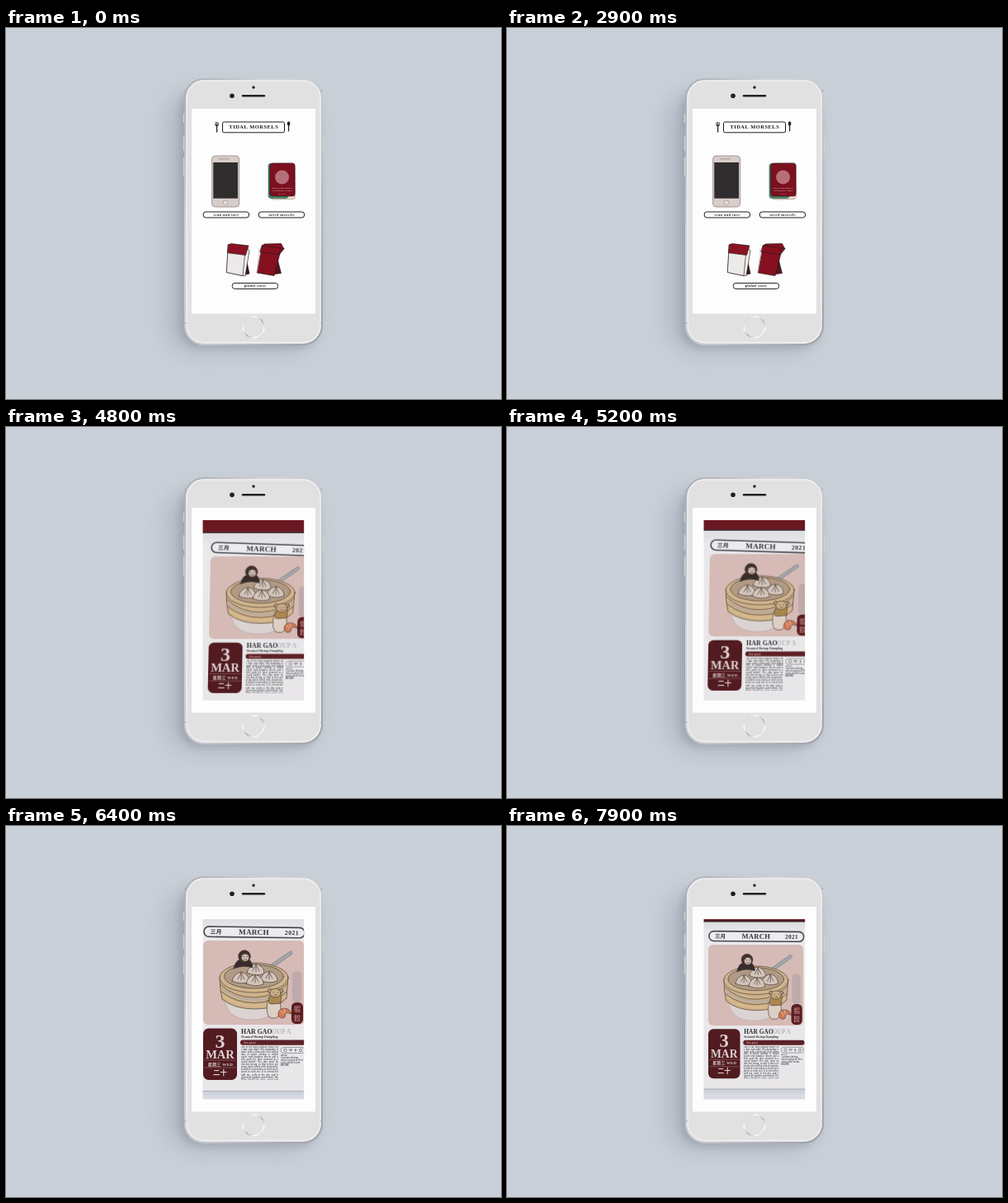
These frames come from a looping animation (600 by 450 pixels, 8 s). An HTML page:

```html
<!DOCTYPE html>
<html lang="en">
<head>
<meta charset="utf-8">
<title>Calendar app</title>
<style>
html, body { margin: 0; width: 100%; height: 100%; overflow: hidden; background: #cad0d8; }
svg { display: block; width: 600px; height: 450px; }
text { font-family: "Liberation Serif", "Noto Sans CJK SC", "Noto Sans CJK", serif; font-weight: bold; text-anchor: middle; }
.start text, text.start { text-anchor: start; }
.label text { font-size: 4.5px; letter-spacing: .38px; fill: #222; }
.pill { fill: #fff; stroke: #1c1a1b; stroke-width: 1; }
.ink { stroke: #453730; stroke-width: .65; stroke-linejoin: round; stroke-linecap: round; }
.copy { font: 2.7px/3.05px "Noto Serif", serif; color: #38363c; text-align: justify; overflow: hidden; }
</style>
</head>
<body>
<svg viewBox="0 0 600 450">
<defs>
  <linearGradient id="rim" x2="1" y2="1">
    <stop stop-color="#a9adb3"/><stop offset=".3" stop-color="#d3d5d8"/><stop offset=".6" stop-color="#c3c5c9"/><stop offset="1" stop-color="#9da0a6"/>
  </linearGradient>
  <linearGradient id="ring" x2="1" y2="1">
    <stop stop-color="#b5b6b9"/><stop offset=".3" stop-color="#fff"/><stop offset=".55" stop-color="#aeafb3"/><stop offset=".8" stop-color="#fff"/><stop offset="1" stop-color="#b5b6b9"/>
  </linearGradient>
  <linearGradient id="paper" x2="0" y2="1">
    <stop stop-color="#d5d6da"/><stop offset=".12" stop-color="#e9e8ea"/><stop offset="1" stop-color="#e8e6e8"/>
  </linearGradient>
  <linearGradient id="desk" x2="0" y2="1">
    <stop stop-color="#b9c1cc"/><stop offset=".35" stop-color="#d9dde3"/><stop offset="1" stop-color="#b9b4ae"/>
  </linearGradient>
  <filter id="wide" x="-40%" y="-20%" width="180%" height="140%"><feGaussianBlur stdDeviation="15"/></filter>
  <filter id="near" x="-20%" y="-10%" width="140%" height="120%"><feGaussianBlur stdDeviation="5"/></filter>
  <filter id="lens"><feGaussianBlur stdDeviation=".45"/></filter>
  <clipPath id="view"><path d="M238.5 113H361.2V331.6H238.5Z"/></clipPath>
</defs>

<rect width="600" height="450" fill="#cad0d8"/>
<rect x="196" y="78" width="176" height="314" rx="30" fill="#939ba7" opacity=".5" filter="url(#wide)"/>
<rect x="211" y="74" width="168" height="314" rx="24" fill="#868d98" opacity=".45" filter="url(#near)"/>

<!-- handset -->
<path d="M216 104V115M216 131V149M216 157V180M384 132V153" stroke="#cfd1d4" stroke-width="2.4"/>
<rect x="217" y="62" width="166" height="322" rx="23" fill="#e2e1e2" stroke="url(#rim)" stroke-width="2"/>
<rect x="219" y="64" width="162" height="317.5" rx="21" fill="none" stroke="#efeff0" stroke-width="1.4"/>
<path d="M216 76H219M381 76H384M216 358H219M381 358H384" stroke="#a9abae"/>
<circle cx="300" cy="72" r="1.7" fill="#222"/>
<circle cx="274" cy="82.3" r="2.8" fill="#1f1e22"/>
<path d="M287 82.3H313" stroke="#222" stroke-width="2.4" stroke-linecap="round"/>
<circle cx="300" cy="362.8" r="12.8" fill="#e2e1e2" stroke="url(#ring)" stroke-width="1.7"/>
<rect x="225" y="98" width="150" height="248.5" fill="#fefdfe"/>

<g id="home">
  <rect class="pill" x="262.5" y="114" width="75" height="12.8" rx="1.8"/>
  <text x="300.3" y="122.4" font-size="6.4" letter-spacing=".55" fill="#1c1a1b">TIDAL MORSELS</text>
  <g fill="none" stroke="#222" stroke-linecap="round">
    <path d="M254 114.4V117.2M255.6 114.4V118M257.2 114.4V117.2" stroke-width=".8"/>
    <path d="M254 117.5Q255.6 120 257.2 117.5M255.6 119V126" stroke-width="1.3"/>
    <path d="M342.6 118V125" stroke-width="1.2"/>
  </g>
  <ellipse cx="342.6" cy="116" rx="1.8" ry="2.7" fill="#222"/>

  <rect x="249.6" y="155" width="33" height="62" rx="4" fill="#d9cdc9" stroke="#8d8583" stroke-width=".8"/>
  <path d="M258 158.7H271" stroke="#a59a97" stroke-width="1.4" stroke-dasharray="1.5 .7"/>
  <circle cx="266" cy="211.7" r="2.8" fill="#e7dedb" stroke="#948b89" stroke-width=".6"/>
  <rect x="251.2" y="163" width="29.8" height="43.7" fill="#302d2e"/>
  <g id="preview">
    <rect x="251.2" y="163" width="29.8" height="43.7" fill="#fdfbfb"/>
    <rect x="254" y="165.8" width="23.5" height="2.7" rx="1.3" fill="#fff" stroke="#555" stroke-width=".5"/>
    <rect x="253.4" y="171" width="25" height="20.5" rx="1" fill="#ebcbae"/>
    <g class="ink">
      <path d="M258 180.5Q258 189 266 188.5T275 180Z" fill="#c59a62"/>
      <ellipse cx="266.3" cy="180.2" rx="8.5" ry="3.8" fill="#e8dac4"/>
      <path d="M270 178L276 173.5" stroke="#777"/>
      <circle cx="263" cy="175.5" r="2" fill="#463330"/><circle cx="271" cy="185.8" r="2" fill="#d7b68c"/>
    </g>
    <rect x="253.4" y="193" width="8.5" height="10.5" rx="1.5" fill="#761522"/>
    <path d="M264 194.5H278M264 197H278M264 199.5H278M264 202H275" stroke="#aaa5a5" stroke-width=".8"/>
  </g>

  <rect x="321" y="163.8" width="29" height="44" rx="3" fill="#eee0ce" stroke="#6e6760" stroke-width=".5" transform="rotate(-1 335 186)"/>
  <rect x="318" y="164.5" width="24" height="42" rx="3" fill="#3b8a6d" stroke="#284b40" stroke-width=".5"/>
  <rect x="319.8" y="164.2" width="30.4" height="39.8" rx="3" fill="#7c101f" stroke="#3c1016" stroke-width=".6"/>
  <circle cx="334.6" cy="181" r="8.5" fill="#b66f78"/>
  <g fill="#e0b9bb" letter-spacing=".15">
    <text x="334.8" y="195" font-size="2.8">TIDAL MORSELS</text>
    <text x="334.8" y="198.4" font-size="2.3">CALENDAR CARDS</text>
    <text x="334.8" y="201.5" font-size="2.3">2 0 2 1</text>
  </g>

  <g class="ink" style="stroke:#241b1c">
    <path d="M290 274L295 298 286 300Z" fill="#3b1419"/>
    <path d="M270 263L291 265.5 295 270 290 300.5 287 300.5 268 296.5Z" fill="#f6f1ee"/>
    <path d="M269.6 263L290.5 265.5 287 300.5 267.6 296.5Z" fill="#eceae9"/>
    <path d="M269.6 262.8L273 261.6 294 264 290.5 275.5 268.8 272.8Z" fill="#8b1222"/>
    <path d="M327 272L333.5 297.5 322 299Z" fill="#56131c"/>
    <path d="M310.5 264L334 266 325 300.5 304.5 297Z" fill="#86101f"/>
    <path d="M310.5 264L313 262 333.5 261.5 337 268 331 275 308 271.5Z" fill="#86101f"/>
    <path d="M310.5 264L332.5 267 331 275M332.5 267L337 267.5" fill="none"/>
    <path d="M307 267L303.8 296" stroke="#d9cfcd" fill="none"/>
  </g>

  <g class="label">
    <rect class="pill" x="239.2" y="223" width="55.3" height="7" rx="3"/><text x="267" y="228">scan and save</text>
    <rect class="pill" x="306.3" y="223" width="55.3" height="7" rx="3"/><text x="334" y="228">saved morsels</text>
    <rect class="pill" x="274.3" y="309.4" width="55.3" height="7" rx="3"/><text x="302" y="314.4">global store</text>
  </g>
</g>

<g id="camera" clip-path="url(#view)">
  <g id="page" filter="url(#lens)">
    <rect x="200" y="313" width="200" height="50" fill="url(#desk)"/>
    <rect x="200" y="100" width="200" height="222" fill="url(#paper)"/>
    <path d="M200 321.5H400" stroke="#a9b2be" stroke-width="1.2"/>
    <rect x="200" y="60" width="200" height="49" fill="#6c1822"/>
    <path d="M200 109.3H400" stroke="#3b2327" stroke-width="2"/>
    <g id="head">
      <rect x="240" y="122" width="122" height="12.4" rx="6" fill="#ecebee" stroke="#48464d" stroke-width="1.6"/>
      <g fill="#37343a">
        <text x="254.5" y="130.8" font-size="7">三月</text>
        <text x="300.5" y="131.1" font-size="9.2" letter-spacing=".2">MARCH</text>
        <text x="346.5" y="130.8" font-size="7.8" letter-spacing=".4">2021</text>
      </g>
    </g>

    <rect x="239" y="139" width="122.5" height="102" rx="6" fill="#d5bab6"/>
    <path d="M318 173L345 154" stroke="#85868b" stroke-width="4.6" stroke-linecap="round"/>
    <path d="M318 173L345 154" stroke="#a5a7ab" stroke-width="3.2" stroke-linecap="round"/>
    <g class="ink">
      <path d="M265 210Q268 235 298 235T330 210Z" fill="#dbd3d2" stroke="#b5aaa8"/>
      <path d="M259 183Q259 198 262 210Q276 222 302 222T340 209L342 183Z" fill="#cdb18b"/>
      <path d="M259.5 192Q278 209 302 208T341.5 191M261 201Q279 215 302 214.5T340.5 201" fill="none"/>
      <path d="M263 198Q280 211 302 211T339 198" fill="none" stroke="#b5aba2" stroke-width="2.2"/>
      <path d="M264 207Q280 218 302 218T338 207" fill="none" stroke="#d8bc8a" stroke-width="2.2"/>
      <ellipse cx="300.5" cy="184" rx="41.5" ry="18" fill="#cfb48c"/>
      <ellipse cx="300.5" cy="182.5" rx="36" ry="14.5" fill="#b19a83"/>
      <g id="buns" fill="#d3c5bc"></g>
      <path d="M276 173Q278 163 284 162L295 162Q299 166 299 172Q288 168 276 173Z" fill="#382c2c"/>
      <circle cx="289" cy="158" r="7.3" fill="#3e3130"/>
      <ellipse cx="290" cy="159.6" rx="4.8" ry="4.6" fill="#d0bab2"/>
      <path d="M287.5 158.5H288.3M291.8 158.5H292.6M288.5 161.8Q290 162.8 291.5 161.8" fill="none"/>
      <path d="M317 212Q314 232 322 233Q334 235 333 219L331 210Z" fill="#ddcfc4"/>
      <path d="M319 207Q316 216 322 216L333 215 334 205Z" fill="#aa874f"/>
      <circle cx="320" cy="200" r="2.6" fill="#b49a79"/><circle cx="333" cy="200" r="2.6" fill="#b49a79"/>
      <ellipse cx="326.5" cy="202.5" rx="6.5" ry="5.3" fill="#c9ad86"/>
      <path d="M324 202H324.5M329 202H329.5M325.5 205H328" fill="none"/>
      <path d="M330 230Q329 222 337 221Q345 222 346 228Q341 225 338 228Q340 233 334 233Z" fill="#d27b54"/>
      <path d="M333 224L336 228M337 221.5L338 227" stroke="#f1d5c2" fill="none"/>
    </g>
    <rect x="347" y="176" width="11" height="38" rx="5" fill="#a89a9e" opacity=".5"/>
    <rect x="346" y="214" width="14" height="26" rx="5.5" fill="#5a1d23"/>
    <g fill="#b27772" font-size="8"><text x="353" y="225.3">蝦</text><text x="353" y="236">餃</text></g>

    <rect x="239" y="245.5" width="41" height="62.5" rx="6.5" fill="#511b20"/>
    <g fill="#ddd0d1">
      <text x="259.5" y="268.5" font-size="24">3</text>
      <text x="259.5" y="281.5" font-size="14.5">MAR</text>
      <text x="260" y="290.5" font-size="5" letter-spacing=".35">星期三 WED</text>
      <text x="259.5" y="302" font-size="8.5">二十</text>
    </g>
    <path d="M240 284H279M240 293H279" stroke="#9a7276" stroke-width=".6"/>

    <g class="start">
      <text x="322" y="251.8" font-size="7.6" fill="#aaa8ad" opacity=".8" letter-spacing=".2">OUP A</text>
      <text x="285" y="252" font-size="7.8" fill="#302d33" letter-spacing=".1">HAR GAO</text>
      <text x="285" y="257" font-size="3.8" fill="#3d3a40">Steamed Shrimp Dumpling</text>
    </g>
    <rect x="284" y="259.6" width="79" height="6.2" rx="3" fill="#5d2027"/>
    <text class="start" x="288" y="263.8" font-size="3.3" fill="#b98f92">(har gaau)</text>
    <foreignObject x="284.5" y="267" width="45.5" height="41.5"><div class="copy" xmlns="http://www.w3.org/1999/xhtml" style="height:41px">One of the most popular dishes on a dim sum table, this dumpling is made with a thin and clear wheat skin. A whole shrimp is folded inside with bamboo shoots and a little pork fat, then steamed in a round basket. The skin must be thin but strong, so that it does not break when lifted with chopsticks. A skilled cook makes at least seven pleats in each one. It is served hot with tea, early in the day, and is shared by families and friends. The filling should be crisp, sweet and full of juice, and each piece is eaten in one or two bites.</div></foreignObject>
    <rect x="333" y="268.5" width="29" height="7" rx="3.4" fill="#eae8eb" stroke="#7a777e" stroke-width=".7"/>
    <g fill="none" stroke="#5b585f" stroke-width=".7">
      <circle cx="338.5" cy="272" r="1.8"/><path d="M343 271Q345 275 347 271ZM351 270V274M349.8 272H352.2"/><circle cx="357" cy="272" r="1.7"/>
    </g>
    <foreignObject x="333" y="277" width="29" height="16"><div class="copy" xmlns="http://www.w3.org/1999/xhtml" style="text-align:left"><b>NOTE</b><br/>Contains shrimp, wheat and pork. Best eaten while warm.<br/><b>RECIPE</b></div></foreignObject>
  </g>
</g>
</svg>
<script>
const $ = id => document.getElementById(id);
const LOOP = 8000, STEP = 100, PREVIEW_AT = 3200, CAMERA_AT = 4800;

// time, page x, y, scale x, scale y, heading tilt, page lean
const path = [
  [4800, 248, 157, 1, 0.98, 2, 1.2],
  [5200, 246, 154, 1, 0.98, 1.8, 1],
  [6400, 239, 139, 1, 1, 0.8, 0],
  [7200, 238, 141, 0.96, 0.967, 0, 0],
  [7900, 244, 144, 0.94, 0.96, 0.4, 0]
];

$('buns').innerHTML = [[285, 184], [303, 174], [319, 183], [302, 187]].map(([x, y]) =>
  `<path d="M${x - 11} ${y + 4}Q${x - 9} ${y - 5} ${x} ${y - 7}Q${x + 10} ${y - 4} ${x + 10} ${y + 5}Q${x} ${y + 9} ${x - 11} ${y + 4}Z"/>` +
  `<path d="M${x} ${y - 6}l-4 8M${x} ${y - 6}l0 9M${x} ${y - 6}l4 8" fill="none"/>`).join('');

function pose(t) {
  let i = 0;
  while (i < path.length - 2 && t > path[i + 1][0]) i++;
  const a = path[i], b = path[i + 1];
  const k = Math.min(1, Math.max(0, (t - a[0]) / (b[0] - a[0])));
  return a.map((v, j) => v + (b[j] - v) * k);
}

function show(id, on) {
  $(id).style.display = on ? '' : 'none';
}

function draw(now) {
  const t = Math.floor(now % LOOP / STEP) * STEP;
  const filming = t >= CAMERA_AT;
  show('home', !filming);
  show('camera', filming);
  show('preview', t >= PREVIEW_AT);
  const [, x, y, sx, sy, tilt, lean] = pose(t);
  $('page').setAttribute('transform', `translate(${x} ${y}) skewX(${-lean}) scale(${sx} ${sy}) translate(-239 -139)`);
  $('head').setAttribute('transform', `rotate(${tilt} 254 128)`);
  requestAnimationFrame(draw);
}
draw(performance.now());
</script>
</body>
</html>
```
